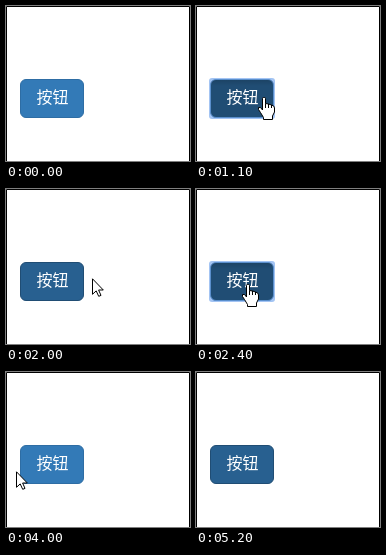
These frames come from a looping animation (184 px wide and 155 px high, 5.7 s). An HTML page:

```html
<!DOCTYPE html>
<html lang="zh">
<head>
<meta charset="utf-8">
<title>按钮</title>
<style>
  html, body { margin: 0; width: 100%; height: 100%; overflow: hidden; background: #fff; }
  svg { display: block; }
  text { font: 300 16px "Noto Sans CJK SC", "Noto Sans CJK", sans-serif; fill: #fff; }
  #arrow, #hand { fill: #fff; stroke: #000; }
  #button { fill: #337ab7; stroke: #2e6da4; }
  #button.hover { fill: #286090; stroke: #204d74; }
  #button.active { fill: #204d74; stroke: #122b40; }
  #button.ringed { stroke: #5a8fcd; }
</style>
</head>
<body>
<svg width="184" height="155" viewBox="0 0 184 155">
  <linearGradient id="inset" x2="0" y2="1">
    <stop stop-opacity=".125"/>
    <stop offset="1" stop-opacity="0"/>
  </linearGradient>
  <path d="M.5 155V.5H183.5V155" fill="none" stroke="#000"/>
  <rect id="ring" x="13" y="72" width="66" height="41" rx="3" fill="#a3c4f3"/>
  <rect id="button" x="14.5" y="73.5" width="63" height="38" rx="5.5"/>
  <rect id="shade" x="15" y="74" width="62" height="6" rx="4" fill="url(#inset)"/>
  <text x="30.5" y="97">按钮</text>
  <path id="arrow" d="M.5 .8V16.3L4.2 12.9L6.7 18.3L9 17.4L6.6 12H11.3Z"/>
  <path id="hand" d="M-1.5 13V1.5Q-1.5 .5 -.5 .5H.5Q1.5 .5 1.5 1.5V6.5L4.5 7L7.5 8Q10.5 8.5 10.5 11V15L8.5 19V22.5H-.5V20.5L-3.5 15.5L-5.5 12.5V10.5H-3.5L-1.5 13M1.5 6.5V11M4.5 7V11M7.5 8V11"/>
</svg>
<script>
const LOOP = 5700, STEP = 100;

// Pointer stops: arrival time, x, y
const stops = [
  [100, 112, 86], [600, 59, 92], [1300, 107, 88], [1700, 112, 90], [2000, 86, 89],
  [2300, 52, 95], [2900, 112, 99], [3100, 182, 97], [3400, 150, 99], [3600, 76, 99],
  [3700, 7, 99], [4200, 42, 94], [4600, 100, 97], [5200, 190, 160]
];
const presses = [[700, 1500], [2400, 2500], [4200, 4700]];
const BLUR = 3400;

const [ring, button, shade, arrow, hand] =
  ["ring", "button", "shade", "arrow", "hand"].map(id => document.getElementById(id));

// The pointer rests at each stop, then hurries to the next one.
function pointerAt(t) {
  const i = stops.findIndex(s => s[0] >= t);
  if (i < 1) return (i ? stops.at(-1) : stops[0]).slice(1);
  const [t0, ...from] = stops[i - 1], [t1, ...to] = stops[i];
  const p = ((t - t0) / (t1 - t0)) ** 5;
  return from.map((v, k) => Math.round(v + (to[k] - v) * p));
}

const isOver = ([x, y]) => x > 14 && x < 76 && y > 73 && y < 112;

function show(el, on) {
  el.setAttribute("visibility", on ? "visible" : "hidden");
}

function draw(now) {
  const t = Math.floor(now % LOOP / STEP) * STEP;
  const pos = pointerAt(t), over = isOver(pos), visible = t >= stops[0][0];
  const [down, up] = presses.findLast(p => p[0] <= t) || [];
  const active = t < up;
  const focused = t >= down && !(down < BLUR && t >= BLUR);
  // Letting go outside the button drops its focus ring.
  const ringed = active || focused && isOver(pointerAt(up));

  button.classList.toggle("hover", over || focused);
  button.classList.toggle("active", active);
  button.classList.toggle("ringed", ringed);
  show(ring, ringed);
  show(shade, active);
  show(arrow, visible && !over);
  show(hand, visible && over);
  (over ? hand : arrow).setAttribute("transform", `translate(${pos})`);
}

const start = performance.now();
function tick() {
  draw(performance.now() - start);
  requestAnimationFrame(tick);
}
tick();
</script>
</body>
</html>
```
